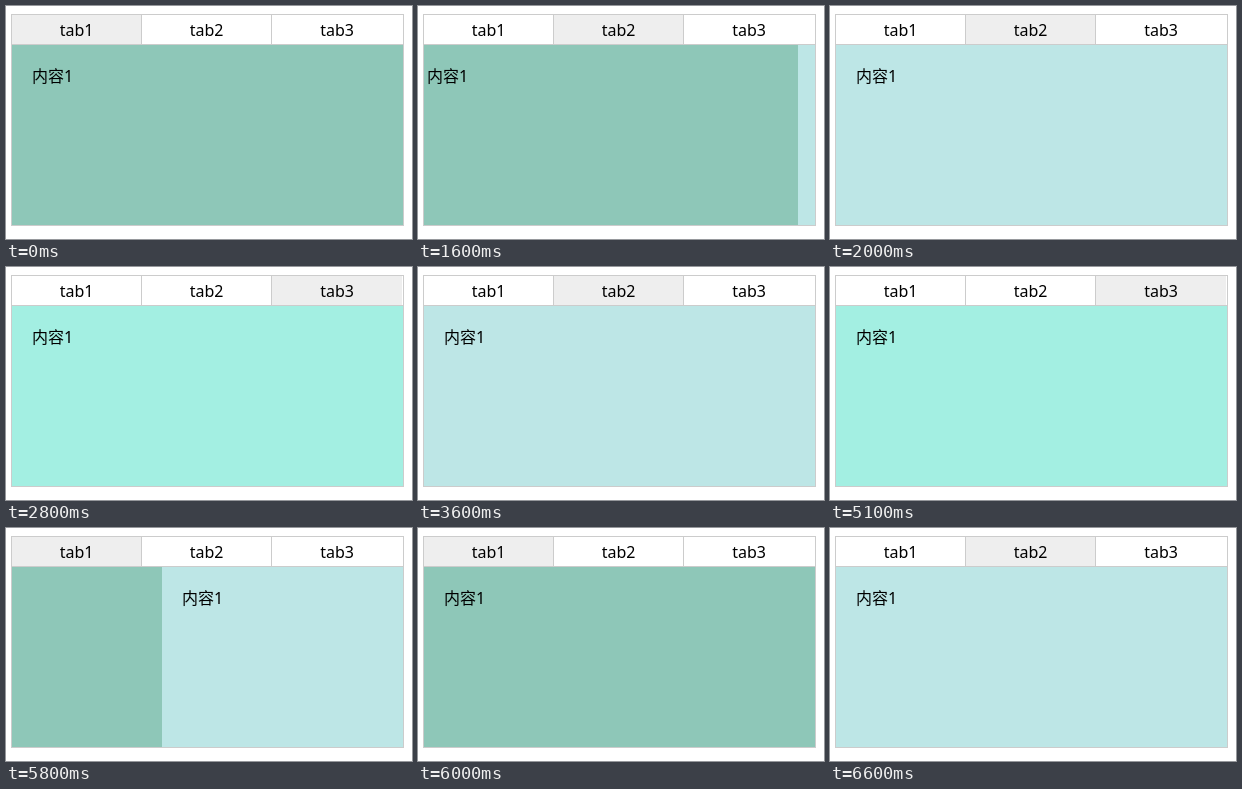
An HTML page that plays this animation: 406 px wide and 233 px high, repeating every 7.8 s.

```html
<!DOCTYPE html>
<html lang="zh">
<head>
<meta charset="utf-8">
<style>
html, body { margin: 0; width: 100%; height: 100%; overflow: hidden; background: #fff; }
svg { display: block; }
text { font: 16px "Noto Sans", "Noto Sans CJK SC", "Noto Sans CJK", sans-serif; fill: #000; }
</style>
</head>
<body>
<svg width="406" height="233">
  <rect x="5" y="8" width="393" height="212" fill="#ccc"/>
  <rect x="6" y="9" width="391" height="29" fill="#fff"/>
  <g id="tabs"></g>
  <svg x="6" y="39" width="391" height="180"><g id="strip"></g></svg>
</svg>
<script>
const LOOP = 7800, STEP = 100, SLIDE = 400, WIDTH = 391;
const colors = ['#8ec7b8', '#bde6e6', '#a3efe2'];
// start time, tab left, tab entered, time already run at the first step
const moves = [
  [1600, 0, 1, 53],
  [2500, 1, 2, 150],
  [3200, 2, 1, 53],
  [4000, 1, 0, 53],
  [4700, 0, 2, 53],
  [5700, 2, 0, 150],
  [6300, 0, 1, 150]
];
const tabs = document.getElementById('tabs');
const strip = document.getElementById('strip');

tabs.innerHTML = colors.map((_, i) => {
  const x = 6 + 130 * i;
  const line = i < 2 ? `<rect x="${x + 129}" y="9" width="1" height="29" fill="#ccc"/>` : '';
  return `<rect class="tab" x="${x}" y="9" width="${i < 2 ? 129 : 130}" height="29"/>${line}
    <text x="${x + 64.5 + (i > 1 ? 0.5 : 0)}" y="30" text-anchor="middle">tab${i + 1}</text>`;
}).join('');
const cells = tabs.querySelectorAll('.tab');

strip.innerHTML = colors.map((color, i) =>
  `<rect x="${i * WIDTH}" width="${WIDTH}" height="180" fill="${color}"/>
   <text x="${i * WIDTH + 20}" y="37">内容1</text>`).join('');

const swing = p => 0.5 - Math.cos(Math.PI * p) / 2;

function draw(now) {
  const t = Math.floor(now % LOOP / STEP) * STEP;
  let active = 0, pos = 0;
  for (const [start, from, to, lead] of moves) {
    if (t < start) break;
    const p = Math.min(1, (t - start + lead) / SLIDE);
    active = to;
    pos = from + (to - from) * swing(p);
  }
  cells.forEach((cell, i) => cell.setAttribute('fill', i === active ? '#eee' : '#fff'));
  strip.setAttribute('transform', `translate(${-Math.round(pos * WIDTH)} 0)`);
}

const begin = performance.now();
function tick() {
  draw(performance.now() - begin);
  requestAnimationFrame(tick);
}
tick();
</script>
</body>
</html>
```
